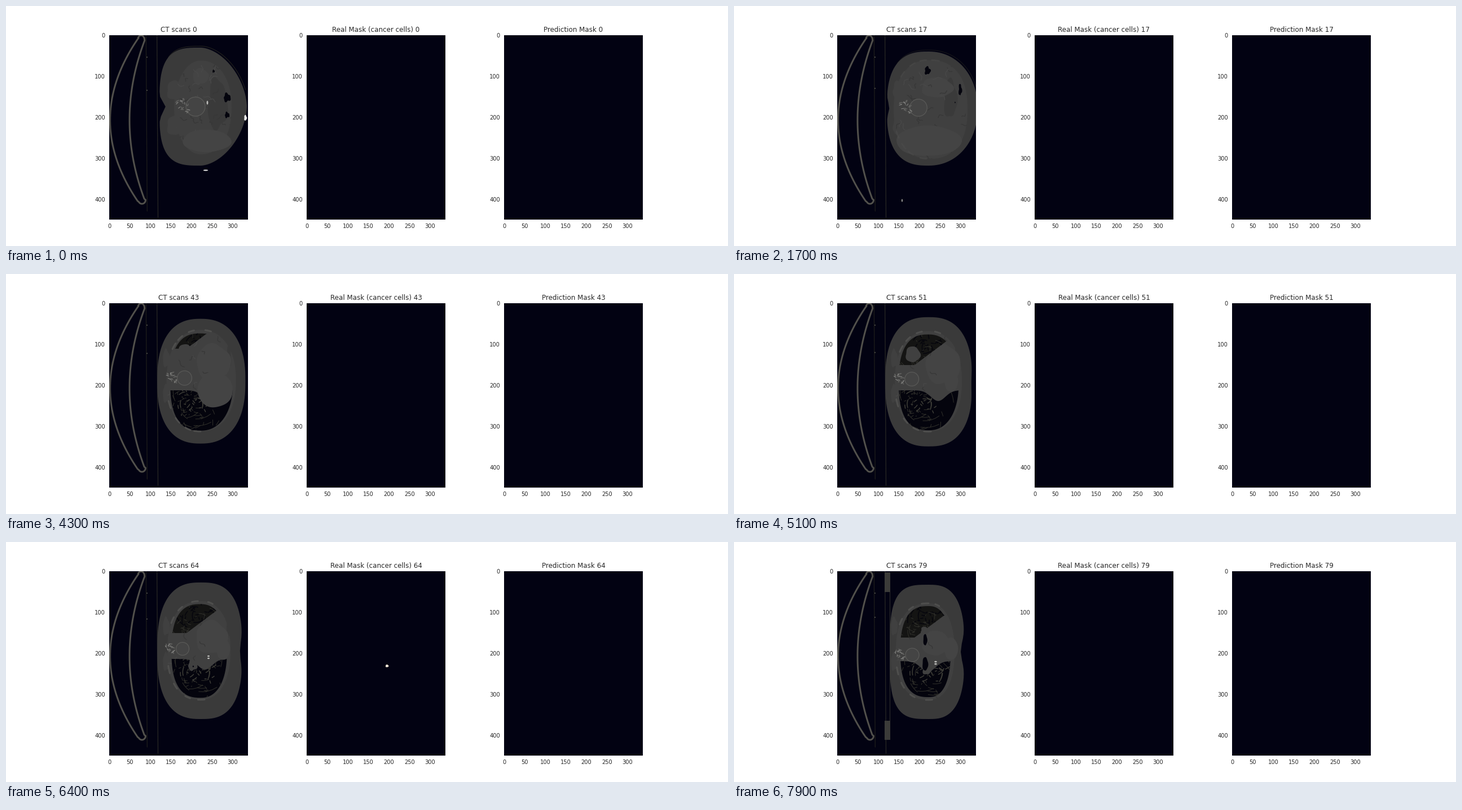
A matplotlib script for the animation above (8 s loop, 1280 px wide and 427 px high).

```python
import itertools

import matplotlib.pyplot as plt
import numpy as np
from matplotlib.animation import FuncAnimation
from matplotlib.collections import LineCollection
from matplotlib.patches import Polygon
from matplotlib.transforms import Affine2D

W, H, DPI = 1280, 427, 64
SLICES, STEP_MS = 80, 100
PT = 72 / DPI                      # points per pixel
LEFT, TOP, PANEL_W, PANEL_H, PITCH = 183, 52, 246, 328, 350
NAVY, INK = "#020212", "#262626"
FAT, WALL, ORGAN = "#3a3a3a", "#404040", "#444444"
AIR, VESSEL, BONE = "#04040d", "#30302b", "#5a5a58"
TITLES = ("CT scans", "Real Mask (cancer cells)", "Prediction Mask")

plt.rcParams["font.family"] = "DejaVu Sans"
fig = plt.figure(figsize=(W / DPI, H / DPI), dpi=DPI, facecolor="white")
PX = Affine2D().scale(1 / W, -1 / H).translate(0, 1) + fig.transFigure
layer = itertools.count(1)


def panel(i):
    ax = fig.add_axes([(LEFT + i * PITCH) / W, 1 - (TOP + PANEL_H) / H,
                       PANEL_W / W, PANEL_H / H], facecolor=NAVY)
    ax.set(xlim=(-.5, 337.5), ylim=(449.5, -.5),
           xticks=range(0, 301, 50), yticks=range(0, 401, 100))
    ax.tick_params(length=0, pad=7 * PT, labelsize=9.88 * PT, labelcolor=INK)
    ax.spines[:].set_visible(False)
    return ax


axes = [panel(i) for i in range(3)]
ct, mask, _ = axes


def tween(keys, n):
    """Values at slice n, linear between keyed slices."""
    columns = np.array(list(keys.values()), float).T
    return np.array([np.interp(n, list(keys), c) for c in columns])


def ramp(n, start, end, low=0., high=1.):
    return np.interp(n, [start, end], [low, high])


ANGLE = np.linspace(0, 2 * np.pi, 120, endpoint=False)
COS, SIN = np.cos(ANGLE), np.sin(ANGLE)


def rounded(left, right, top, bottom, left_power, right_power, apex=345):
    """Closed curve of superellipse halves joined at x = apex."""
    power = 2 / np.where(COS < 0, left_power, right_power)
    reach = np.where(COS < 0, apex - left, right - apex)
    x = apex + reach * np.sign(COS) * np.abs(COS) ** power
    y = (top + bottom) / 2 + (bottom - top) / 2 * np.sign(SIN) * np.abs(SIN) ** power
    return x, y


def bump(v, centre, width):
    return np.exp(-((v - centre) / width) ** 2)


def body_curve(n):
    x, y = rounded(*tween({0: (272, 427, 74, 284, 3.3, 1.75),
                           17: (271, 432, 81, 284, 2.7, 2.1),
                           34: (268, 427, 83, 296, 2.4, 2.2),
                           64: (268, 419, 72, 315, 2.6, 2.8),
                           79: (276, 409, 76, 315, 3.4, 2.8)}, n))
    notch = ramp(n, 0, 28, 11, 0) * bump(y, 181, 13)
    waist = ramp(n, 42, 79, 0, 7) * bump(y, 195, 25)
    return np.column_stack([x + np.where(COS < 0, notch, -waist), y])


def cavity_curve(n):
    return np.column_stack(rounded(*tween({0: (298, 400, 97, 264, 2, 2.2),
                                           17: (283, 414, 96, 272, 2.2, 2.4),
                                           34: (284, 412, 97, 280, 2.2, 2.2),
                                           79: (287, 391, 109, 281, 2.4, 2.3)}, n)))


def lung_space(n):
    return rounded(*tween({40: (291, 404, 105, 279, 2.6, 2.2),
                           79: (295, 384, 114, 276, 2.6, 2.4)}, n))


def lower_lung(n):
    x, y = lung_space(n)
    ceiling = 207 + ramp(n, 60, 79, 0, 5) + 19 * bump(x, ramp(n, 51, 76, 362, 344), 18)
    return np.column_stack([x, np.maximum(y, ceiling + ramp(n, 26, 33, 75, 0))])


def upper_lung(n):
    x, y = lung_space(n)
    floor = 162 + ramp(n, 64, 79, 0, 8) - .75 * np.maximum(0, x - 320)
    return np.column_stack([x, np.minimum(y, floor - ramp(n, 38, 50, 50, 0))])


class Form:
    """Filled outline computed from the slice number."""
    every = []

    def __init__(self, fill, curve, ax=ct, first=0):
        self.curve, self.first = curve, first
        self.patch = Polygon(np.zeros((3, 2)), fc=fill, lw=0, transform=PX,
                             zorder=next(layer))
        ax.add_patch(self.patch)
        Form.every.append(self)

    def draw(self, n):
        self.patch.set_xy(self.curve(n))
        self.patch.set_visible(n >= self.first)


def oval(fill, keys, rough=0., ax=ct):
    """Oval keyed by slice as (cx, cy, rx, ry), with an uneven rim."""
    def curve(n):
        cx, cy, rx, ry = tween(keys, n)
        r = 1 + rough * (np.sin(3 * ANGLE + 1) + .7 * np.sin(5 * ANGLE + cx * .3))
        return np.column_stack([cx + rx * r * COS, cy + ry * r * SIN])
    return Form(fill, curve, ax)


def strokes(colour, width, segments=(), clip=None):
    lines = LineCollection(list(segments), colors=colour, linewidths=width * PT,
                           transform=PX, zorder=next(layer), capstyle="round")
    ct.add_collection(lines, autolim=False)
    if clip:
        lines.set_clip_path(clip.patch)
    return lines


# Scanner table: two parabolas joined by round tips
def couch_side(start, end, x, spread):
    y = np.linspace(start, end, 50)
    return np.column_stack([x + spread * ((y - 203) / 150) ** 2, y])


def arc(cx, cy, rx, ry, start, end):
    a = np.radians(np.linspace(start, end, 12))
    return np.column_stack([cx + rx * np.cos(a), cy + ry * np.sin(a)])


outer = couch_side(57, 347, 184.5, 53)
inner = couch_side(343, 61, 219, 30)
couch = np.vstack([outer, arc(241, 345, 6.5, 7, 150, 0), inner,
                   arc(239.5, 59.5, 6, 7, 0, -150), outer[:1]])
strokes("#42413e", 3.2, [couch])
strokes("#575651", 1.6, [couch])
strokes("#1d1d1b", 1.3, [[(248.3, 52), (250.3, 365)]])
strokes("#272724", 1.3, [[(267.6, 52), (269.5, 376)]])
oval("#55554f", {0: (250, 91, 1, 1)})
oval("#55554f", {0: (250, 150, 1, 1), 79: (250, 134, 1, 1)})


# Arm board growing beside the table
def board(top, bottom, edge):
    def curve(n):
        right = np.interp(n, [66, 73, 79], [268, 272, 277])
        left = right - 1.5 if edge else 267.3
        return [(left, top), (right, top), (right, bottom), (left, bottom)]
    return curve


for top, bottom, edge in ((54, 88.5, False), (88.5, 318, True), (318, 352, False)):
    Form("#30302d" if edge else "#3b3b39", board(top, bottom, edge), first=67)

# Body wall and soft organs
skin = strokes("#24241f", 1)
Form(FAT, body_curve)
cavity = Form(WALL, cavity_curve)
for y in (150, 213):
    oval(WALL, {0: (299, y, 14, 17), 34: (284, y, 6, 16)}, .08)
oval(FAT, {0: (375, 175, 17, 45), 40: (395, 150, 4, 20)}, .1)
oval(ORGAN, {0: (345, 125, 14, 14), 17: (360, 145, 28, 18),
             51: (370, 160, 31, 36), 79: (358, 180, 25, 22)}, .05)

rng = np.random.default_rng(7)
SPOTS = rng.uniform(0, 1, (70, 5))
TWIGS = rng.uniform(0, 1, (220, 4))
SPIKES = rng.normal(0, 1, (20, 3)).clip(-1.6, 1.6)
mottle = strokes("#373737", 1.3, clip=cavity)
sheen = strokes("#494949", 1.2, clip=cavity)

# Lungs, with the liver and stomach domes in front
upper = Form("#141413", upper_lung, first=39)
lower = Form(AIR, lower_lung, first=27)
lower_fine = strokes(VESSEL, 1, clip=lower)
lower_thick = strokes("#3d3d37", 1.5, clip=lower)
upper_air = strokes("#07070d", 1.8, clip=upper)
upper_fine = strokes(VESSEL, 1, clip=upper)
oval(ORGAN, {0: (356, 240, 43, 20), 17: (345, 240, 58, 27),
             34: (352, 226, 56, 47), 50: (385, 190, 12, 20)}, .02)
oval(WALL, {39: (318, 138, 0, 0), 44: (318, 139, 17, 17),
            51: (317, 143, 13, 14), 60: (318, 148, 0, 0)}, .06)

# Hilum, airways and bowel gas
oval(WALL, {55: (332, 213, 0, 0), 64: (331, 219, 8, 10), 79: (342, 226, 8, 10)}, .1)
oval(WALL, {66: (332, 156, 0, 0), 73: (333, 155, 8, 6), 79: (338, 158, 7, 7)}, .1)
oval(AIR, {60: (331, 224, 0, 0), 73: (334, 215.5, 4, 4.5), 79: (339, 217, 5, 12)}, .06)
oval(AIR, {74: (338, 172, 0, 0), 79: (339, 174, 3.5, 10)}, .06)
oval(AIR, {0: (392, 163, 6, 7.5), 17: (401, 149, 2.8, 10), 26: (402, 145, 0, 0)}, .16)
oval(AIR, {0: (392, 194, 4, 5), 22: (392, 165, 0, 0)}, .16)
oval(AIR, {0: (368, 116, 2, 2.5), 17: (343, 115, 5, 7),
           34: (364, 118, 7.5, 7), 42: (362, 115, 0, 0)}, .16)

# Spine and ribs
SPINE = {0: (336, 179, 17), 34: (318, 183, 13.5), 64: (313, 190, 11.5), 79: (316, 201, 12)}
for fill, grow in ((BONE, .6), (ORGAN, -.6)):
    oval(fill, {k: (x, y, r + grow, r + grow) for k, (x, y, r) in SPINE.items()})
spine_dim = strokes("#646462", 1.4)
spine_lit = strokes("#888886", 1)
ribs = strokes(BONE, 2.6)
marrow = strokes("#474746", 1)

# Bright specks
oval("#f2f2f2", {0: (424.5, 199, 2.3, 5), 6: (427, 199, 0, 0)}, .1)
oval("#e4e4e2", {0: (354, 292.3, 4.2, 1.1), 8: (352, 293, 0, 0)})
oval("#8d8d8b", {11: (298, 346, 0, 0), 17: (298, 346, 1.2, 2.6), 23: (298, 346, 0, 0)})
oval("#bdbdbb", {0: (357, 172, 1.4, 3.4), 7: (357, 172, 0, 0)})
for dy in (-2, 2):
    oval("#c0c0bd", {58: (360, 203 + dy, 0, 0), 64: (359, 205 + dy, 2, 1.2),
                     79: (357.5, 215 + dy, 2.3, 1.3)})

# Labelled tumour
oval("#faebdd", {60: (675.5, 220.5, 0, 0), 64: (675.5, 220.5, 2.7, 2.3),
                 69: (675.5, 220.5, 0, 0)}, .09, mask)


def streaks(n, rows):
    """Short wavy marks that drift over the cavity."""
    t = np.linspace(-1, 1, 6)
    for u, v, a, size, k in rows:
        x = 288 + 122 * u + 4 * np.sin(n / 9 + 6 * k)
        y = 98 + 176 * v + 4 * np.cos(n / 11 + 6 * a)
        c, s = np.cos(6.3 * a + n * .02), np.sin(6.3 * a + n * .02)
        along, across = (2 + 7 * size) * t, 1.8 * np.sin(3 * t + 6 * k)
        yield np.column_stack([x + along * c - across * s, y + along * s + across * c])


def twigs(n, hub, reach, rows):
    """Curved vessels pointing away from the hilum."""
    for a, r, size, bend in rows:
        start = reach * (.08 + .95 * ((r + .006 * n) % 1))
        s = np.linspace(0, 1.5 + 6 * size, 5)
        turn = 2 * np.pi * a + .006 * n + (bend - .5) * s * .2
        yield np.column_stack([hub[0] + (start + s) * np.cos(turn),
                               hub[1] + (start + s) * np.sin(turn)])


def spikes(n, rows):
    """Bony processes behind the vertebra."""
    cx, cy, size = tween(SPINE, n)
    for u, v, a in rows:
        x, y, turn = cx - 22 + .4 * size * u, cy + .5 * size * v, 2 * a + .03 * n
        dx, dy = 2.4 * np.cos(turn), 1.8 * np.sin(turn)
        yield [(x - dx, y - dy), (x + dx, y + dy)]


def rib_arcs(n):
    """Pieces of the cavity wall, sliding slowly along it."""
    curve = cavity_curve(n)
    for k in range(10):
        start = int(30 + 7 * k + 2 * np.sin(n / 14 + k))
        if abs(start - 60) > 6:
            yield curve[start:start + 4]


def draw(n):
    for ax, title in zip(axes, TITLES):
        ax.set_title(f"{title} {n}", fontsize=11.85 * PT, pad=6 * PT, color=INK)
    for form in Form.every:
        form.draw(n)

    busy = int(np.interp(n, [0, 34, 79], [42, 14, 10]))
    mottle.set_segments(list(streaks(n, SPOTS[:busy])))
    sheen.set_segments(list(streaks(n, SPOTS[45:45 + busy // 2])))

    hub = ramp(n, 51, 73, 328, 344), 222
    lower_fine.set_segments(list(twigs(n, hub, 62, TWIGS[:110])))
    lower_thick.set_segments(list(twigs(n, hub, 35, TWIGS[110:140])))
    upper_air.set_segments(list(twigs(n, (346, 122), 38, TWIGS[140:190])))
    upper_fine.set_segments(list(twigs(n, (332, 146), 42, TWIGS[180:])))
    for lines, lung in ((lower_fine, lower), (lower_thick, lower),
                        (upper_air, upper), (upper_fine, upper)):
        lines.set_visible(n >= lung.first)

    spine_dim.set_segments(list(spikes(n, SPIKES[:13])))
    spine_lit.set_segments(list(spikes(n, SPIKES[13:])))
    arcs = list(rib_arcs(n))
    for lines in (ribs, marrow):
        lines.set_segments(arcs)
        lines.set_alpha(float(ramp(n, 10, 34, 0, .9)))

    skin.set_segments([body_curve(n)[75:115] + (2, -2.5)])
    skin.set_alpha(float(ramp(n, 12, 26, 1, 0)))
    return []


animation = FuncAnimation(fig, draw, frames=SLICES, interval=STEP_MS,
                          init_func=lambda: draw(0), repeat=True, repeat_delay=0)
plt.show()
```
